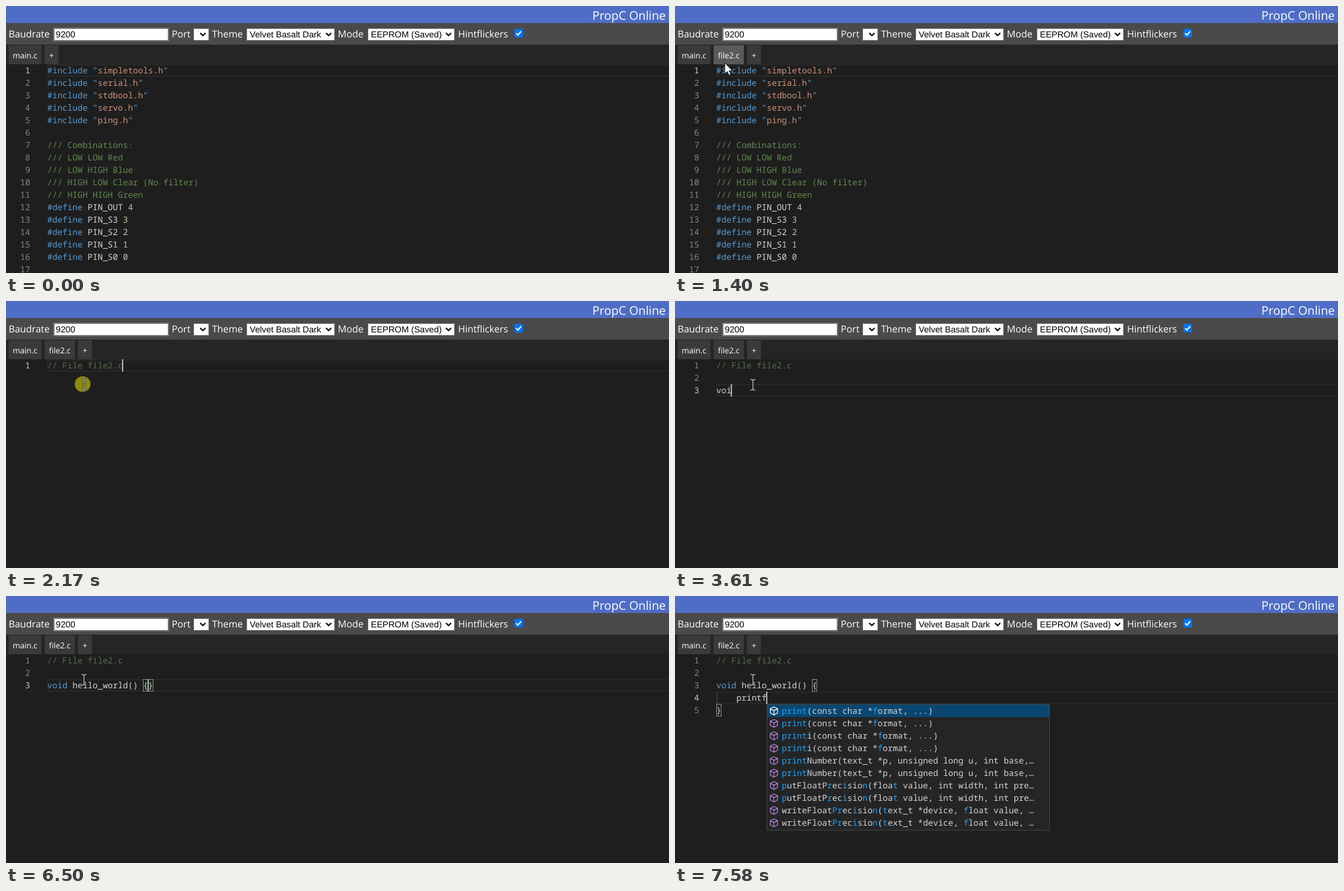
An HTML page that plays this animation: 1012 px wide and 408 px high, repeating every 8000 ms.

```html
<!DOCTYPE html>
<html lang="en">
<head>
<meta charset="utf-8">
<title>PropC Online</title>
<style>
  html, body { margin: 0; width: 100%; height: 100%; overflow: hidden; background: #1e1e1e; }
  svg { display: block; }
  text { white-space: pre; text-rendering: geometricPrecision; }
  .ui { font-family: "Open Sans", "Noto Sans", sans-serif; fill: #fff; }
  .form { font: 13.333px "Liberation Sans", Arial, sans-serif; fill: #000; }
  .code { font: 12.83px "Noto Sans Mono", "DejaVu Sans Mono", monospace; fill: #d4d4d4; }
</style>
</head>
<body>
<svg width="1012" height="408" viewBox="0 0 1012 408">
  <g id="bars"></g>
  <g id="tabs"></g>
  <g id="editor"></g>
  <g id="popup"></g>
  <circle id="click" r="12" fill="#fff500" fill-opacity=".5"/>
  <path id="arrow" d="M0 0V16.5L3.8 13L6.4 18.8L9 17.6L6.5 12H11.8Z" fill="#fff" stroke="#000" stroke-width=".9"/>
  <g id="beam" fill="none">
    <path d="M-4-8H-1.5L0-7L1.5-8H4M-4 8H-1.5L0 7L1.5 8H4M0-7V7" stroke="#111" stroke-width="2.6"/>
    <path d="M-4-8H-1.5L0-7L1.5-8H4M-4 8H-1.5L0 7L1.5 8H4M0-7V7" stroke="#e4e4e4" stroke-width="1.1"/>
  </g>
</svg>
<script>
const LOOP = 8000, LEFT = 63, TOP = 89, ROW = 19, CHAR = 7.697;
const $ = id => document.getElementById(id);
const esc = s => s.replace(/&/g, '&amp;').replace(/</g, '&lt;');
const rect = (x, y, w, h, fill, more = '') =>
  `<rect x="${x}" y="${y}" width="${w}" height="${h}" fill="${fill}" ${more}/>`;
const text = (x, y, s, cls, more = '') => `<text x="${x}" y="${y}" class="${cls}" ${more}>${s}</text>`;
const span = (s, fill) => `<tspan fill="${fill}">${esc(s)}</tspan>`;
const colX = n => LEFT + n * CHAR;

// Title and toolbar
const label = (x, s) => text(x, 48, s, 'ui', 'font-size="14.6"');
const select = (x, w, s) =>
  rect(x + .5, 34.5, w - 1, 18, '#fff', 'stroke="#767676"') + text(x + 5, 48, s, 'form') +
  `<path d="M${x + w - 13.5} 41.2l4 4 4-4" fill="none" stroke="#000" stroke-width="2"/>`;

$('bars').innerHTML =
  rect(0, 0, 1012, 26, '#4f6dc6') + rect(0, 26, 1012, 33, '#4a4a4a') + rect(0, 59, 1012, 30, '#252526') +
  text(1007, 21, 'PropC Online', 'ui', 'font-size="18.15" text-anchor="end"') +
  label(4, 'Baudrate') + label(253, 'Port') + label(314.5, 'Theme') + label(506.5, 'Mode') + label(690, 'Hintflickers') +
  rect(73, 34, 175, 19, '#fff', 'stroke="#767676" stroke-width="2"') + text(76, 48, '9200', 'form') +
  select(286, 24, '') + select(367, 135, 'Velvet Basalt Dark') + select(552, 133, 'EEPROM (Saved)') +
  rect(776, 35, 13, 13, '#0075ff', 'rx="2"') +
  '<path d="M778.6 41.6l2.8 2.8 5-5.8" fill="none" stroke="#fff" stroke-width="2"/>';

// Files
const includes = ['simpletools', 'serial', 'stdbool', 'servo', 'ping'].map(n => `#include "${n}.h"`);
const combos = ['Combinations:', 'LOW LOW Red', 'LOW HIGH Blue', 'HIGH LOW Clear (No filter)', 'HIGH HIGH Green'];
const pins = ['OUT 4', 'S3 3', 'S2 2', 'S1 1', 'S0 0'].map(p => '#define PIN_' + p);
const mainFile = [...includes, '', ...combos.map(c => '/// ' + c), ...pins, ''];
const HEAD = '// File file2.c', FUNC = 'void hello_world';

const paint = line => esc(line).replace(/(\/\/.*)|(#\w+|\bvoid\b)|"([^"]*)"|\b(\d+)\b/g,
  (all, note, word, str, num) =>
    note ? span(note, note[2] === '/' ? '#608b4e' : '#576c49') :
    word ? span(word, '#569cd6') :
    num ? span(num, '#b5cea8') :
    span('"', '#569cd6') + span(str, '#ce9178') + span('"', '#569cd6'));

// Editor states: time, lines, active row, caret column (-1 hides it), bracket cells [row, col], typed word
const steps = [[0, mainFile, 0, -1]];
const add = (t, lines, row, col, marks, word) => steps.push([t, lines, row, col, marks, word]);
add(1700, [HEAD], 0, -1);
add(2170, [HEAD], 0, 15);
add(2650, [HEAD, ''], 1, 0);
add(2780, [HEAD, '', ''], 2, 0);
add(3280, [HEAD, '', ''], 2, -1);
[3440, 3470, 3610, 3680, 3780, 3900, 4020, 4140, 4280, 4650, 4920, 5090, 5160, 5230, 5330, 5470]
  .forEach((t, i) => add(t, [HEAD, '', FUNC.slice(0, i + 1)], 2, i + 1));
const parens = [[2, 16], [2, 17]], braces = [[2, 19], [2, 20]];
const tail = (t, s, col, marks) => add(t, [HEAD, '', FUNC + s], 2, col, marks);
tail(5830, '()', 17);
tail(5900, '()', 17, parens);
tail(5970, '()', 18, parens);
tail(6030, '() ', 19);
tail(6100, '() {}', 20);
tail(6160, '() {}', 20, braces);
tail(6230, '() {}', 21, braces);
tail(6500, '() {}', 20, braces);
[[6740, ''], [7070, 'p'], [7180, 'pr'], [7280, 'pri'], [7340, 'prin'], [7410, 'print'], [7580, 'printf']]
  .forEach(([t, w]) => add(t, [HEAD, '', FUNC + '() {', '    ' + w, '}'], 3, 4 + w.length, [[2, 19], [4, 0]], w));

function drawEditor([, lines, row, col, marks = []]) {
  let out = rect(LEFT + 1, TOP + row * ROW + 1, 960, ROW - 2, 'none', 'stroke="#282828" stroke-width="2"');
  if (lines.length === 5) out += rect(LEFT, TOP + 3 * ROW, 1, ROW, '#404040');
  for (const [r, c] of marks)
    out += rect(Math.round(colX(c)) + .5, TOP + r * ROW + .5, 7, ROW - 1, '#1b251b', 'stroke="#888"');
  lines.forEach((line, i) => {
    const y = TOP + i * ROW + 14;
    out += text(37, y, i + 1, 'code', `text-anchor="end" style="fill:${i === row ? '#c6c6c6' : '#858585'}"`);
    out += text(LEFT, y, paint(line), 'code');
  });
  if (col >= 0) out += rect(col ? Math.round(colX(col)) - 1 : LEFT, TOP + row * ROW, 2, ROW, '#aeafad');
  $('editor').innerHTML = out;
}

// Suggestions
const twice = s => [s, s];
const print = twice('print(const char *format, ...)');
const printcol = 'printcol(const char* name)';
const printi = twice('printi(const char *format, ...)');
const number = twice('printNumber(text_t *p, unsigned long u, int base,…');
const floats = [...twice('putFloatPrecision(float value, int width, int pre…'),
  ...twice('writeFloatPrecision(text_t *device, float value, …')];
const puts = [...twice('putStr(const char* str)'), ...twice('putStrLen(char* str, int width)')];
const common = [...print, printcol, ...printi, ...number];
const lists = {
  pr: [...common, 'PIN_RIGHT', ...puts],
  pri: [...common, 'PIN_RIGHT', ...floats],
  prin: [...common, ...floats],
  print: [...common, ...floats],
  printf: [...print, ...printi, ...number, ...floats]
};

function mark(s, word) {
  let k = 0;
  return [...s].map(c =>
    k < word.length && c.toLowerCase() === word[k] ? (k++, span(c, '#18a3ff')) : esc(c)).join('');
}

const cube = (x, y, color) =>
  `<path transform="translate(${x} ${y})" d="M0-6L5.5-3.3V3.2L0 6.2L-5.5 3.2V-3.3ZM-5.5-3.3L0-.4L5.5-3.3M0-.4V6.2" ` +
  `fill="none" stroke="${color}" stroke-width="1.2" stroke-linejoin="round"/>`;
const field = (x, y) => rect(x - 6.5, y - 4.5, 13, 9, 'none', 'rx="1" stroke="#d4d4d4"') +
  `<path d="M${x - 4} ${y - 1.5}h8m-8 3h8" stroke="#d4d4d4"/>`;

function drawPopup([, , , col, , word]) {
  const list = lists[word];
  if (!list) return $('popup').innerHTML = '';
  const x = Math.round(colX(col)), y = 166;
  let out = rect(x + .5, y - .5, 431, list.length * ROW + 2.5, '#252526', 'stroke="#454545"') +
    rect(x + 1, y, 430, ROW, '#094771');
  list.forEach((s, i) => {
    const mid = y + i * ROW + 9.5;
    out += s === 'PIN_RIGHT' ? field(x + 11, mid) : cube(x + 11, mid, i ? '#b180d7' : '#fff');
    out += text(x + 23, mid + 4.5, mark(s, word), 'code');
  });
  if (word === 'pr') out += rect(x + 421, y, 10, 35, '#797979', 'fill-opacity=".5"');
  $('popup').innerHTML = out;
}

// Pointer: time, x, y
const path = [[160, 379, 369], [850, 69, 73], [1090, 69, 73], [1230, 75, 90], [1360, 75, 90], [1390, 76, 87],
  [1440, 76, 87], [1600, 78, 77], [1760, 78, 77], [2030, 117, 127]];
const clicks = [[950, 1090], [1630, 1760], [2100, 2240]];

function pointer(t) {
  const i = path.findIndex(p => p[0] > t);
  if (i < 0) return path[path.length - 1].slice(1);
  if (i === 0) return null;
  const [a, ax, ay] = path[i - 1], [b, bx, by] = path[i];
  const k = 1 - (1 - (t - a) / (b - a)) ** 2;
  return [ax + (bx - ax) * k, ay + (by - ay) * k];
}

const place = (id, on, x, y) => {
  $(id).setAttribute('visibility', on ? 'visible' : 'hidden');
  if (on) $(id).setAttribute('transform', `translate(${x} ${y})`);
};

function drawTabs(two, hover) {
  const tabs = two ? [[4, 50, 'main.c'], [59, 46, 'file2.c'], [110, 21, '+']] : [[4, 50, 'main.c'], [59, 21, '+']];
  $('tabs').innerHTML = tabs.map(([x, w, s], i) =>
    rect(x, 60, w, 29, i === hover ? '#5a5a5a' : '#3a3a3b') +
    text(x + w / 2, 80, s, 'ui', 'font-size="12.2" text-anchor="middle"')).join('');
}

let lastStep, lastTabs;
function render(t) {
  const step = steps.filter(s => s[0] <= t).pop();
  if (step !== lastStep) {
    drawEditor(step);
    drawPopup(step);
    lastStep = step;
  }
  const pos = pointer(t), [x, y] = pos || [0, 0];
  const onBar = y < TOP + 2;
  place('arrow', pos && onBar, x, y);
  place('beam', pos && !onBar, x + 2, y + 1);
  place('click', pos && clicks.some(([a, b]) => t >= a && t < b), x, y);

  const two = t >= 1020;
  const hover = pos && y > 59 && y < TOP && x >= 59 && x < (two ? 105 : 80) ? 1 : -1;
  const key = two + ':' + hover;
  if (key !== lastTabs) {
    drawTabs(two, hover);
    lastTabs = key;
  }
}

const start = performance.now();
function tick() {
  render((performance.now() - start) % LOOP);
  requestAnimationFrame(tick);
}
tick();
</script>
</body>
</html>
```
